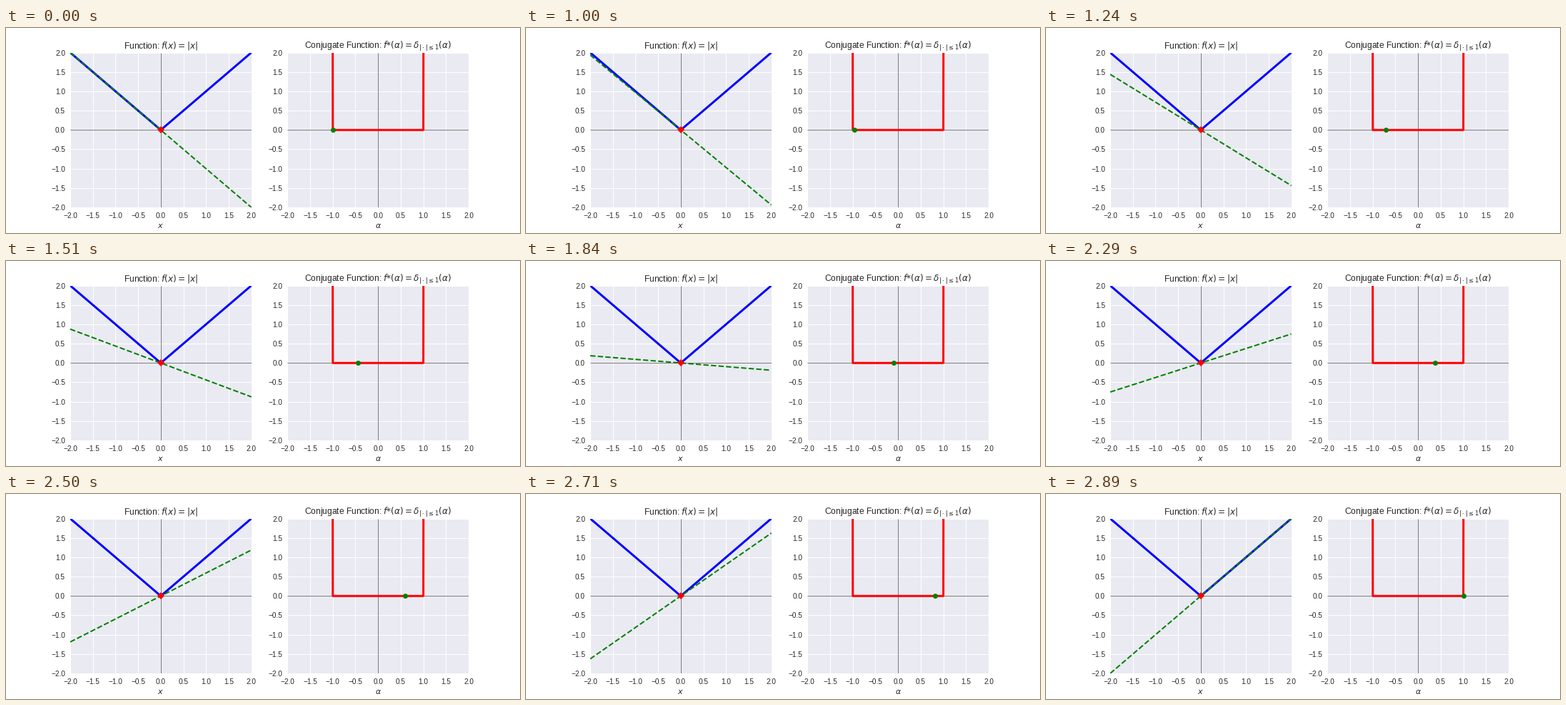
Write a matplotlib script that moves like this. It is 720 by 288 pixels and loops after 3.89 s.

```python
import numpy as np
import matplotlib.pyplot as plt
from matplotlib.animation import FuncAnimation

LOOP, TICK = 3890, 10            # ms
HOLD, STEP, STEPS = 1000, 30, 64  # first pause, time per step, steps from -1 to 1
LIM = 2

plt.rcParams.update({
    "font.family": "sans-serif",
    "font.sans-serif": ["Liberation Sans", "DejaVu Sans"],
    "mathtext.fontset": "dejavusans",
    "text.color": ".15",
    "axes.facecolor": "#EAEAF2",
    "axes.edgecolor": "white",
    "axes.linewidth": 0,
    "axes.labelcolor": ".15",
    "axes.labelsize": 11,
    "axes.titlesize": 12,
    "axes.axisbelow": True,
    "axes.grid": True,
    "grid.color": "white",
    "grid.linewidth": 1,
    "lines.solid_capstyle": "round",
    "lines.markersize": 7,
    "lines.markeredgewidth": 0,
    "figure.subplot.bottom": 0.125,
})
for axis in ("xtick", "ytick"):
    plt.rcParams.update({
        f"{axis}.color": ".15",
        f"{axis}.labelsize": 10,
        f"{axis}.major.size": 0,
        f"{axis}.major.pad": 7,
    })

fig = plt.figure(figsize=(10, 4), dpi=72)


def panel(ax, title, label):
    ax.set(xlim=(-LIM, LIM), ylim=(-LIM, LIM), title=title, xlabel=label)
    ticks = np.arange(-LIM, LIM + 0.1, 0.5)
    ax.set_xticks(ticks)
    ax.set_yticks(ticks)
    ax.axhline(0, color="black", lw=0.5)
    ax.axvline(0, color="black", lw=0.5)


def overlay(pos):
    ax = fig.add_axes(pos, xlim=(-LIM, LIM), ylim=(-LIM, LIM))
    ax.axis("off")
    return ax


# Draw the fixed plots once and keep them as a backdrop.
left, right = fig.subplots(1, 2)
panel(left, "Function: $f(x) = |x|$", "$x$")
panel(right, r"Conjugate Function: $f{*}(\alpha) = \delta_{|\cdot|\leq 1}(\alpha)$",
      r"$\alpha$")
x = np.linspace(-LIM, LIM, 401)
left.plot(x, np.abs(x), color="blue", lw=3)
right.plot([-1.01, -1, 1, 1.01], [10, 0, 0, 10], color="red", lw=3)
fig.canvas.draw()
backdrop = np.array(fig.canvas.buffer_rgba())
boxes = [ax.get_position() for ax in (left, right)]
fig.clear()
fig.figimage(backdrop, zorder=-1)

left, right = map(overlay, boxes)
ends = np.array([-LIM, LIM])
tangent, = left.plot(ends, -ends, color="green", ls="--", lw=2)
left.plot(0, 0, "D", color="red")
dot, = right.plot(-1, 0, "o", color="green")


def update(i):
    step = np.clip((i * TICK - HOLD) // STEP + 1, 0, STEPS)
    slope = -1 + 2 * step / STEPS
    tangent.set_ydata(slope * ends)
    dot.set_xdata([slope])
    return tangent, dot


anim = FuncAnimation(fig, update, frames=LOOP // TICK, interval=TICK,
                     init_func=lambda: update(0), repeat=True, repeat_delay=0)
plt.show()
```
